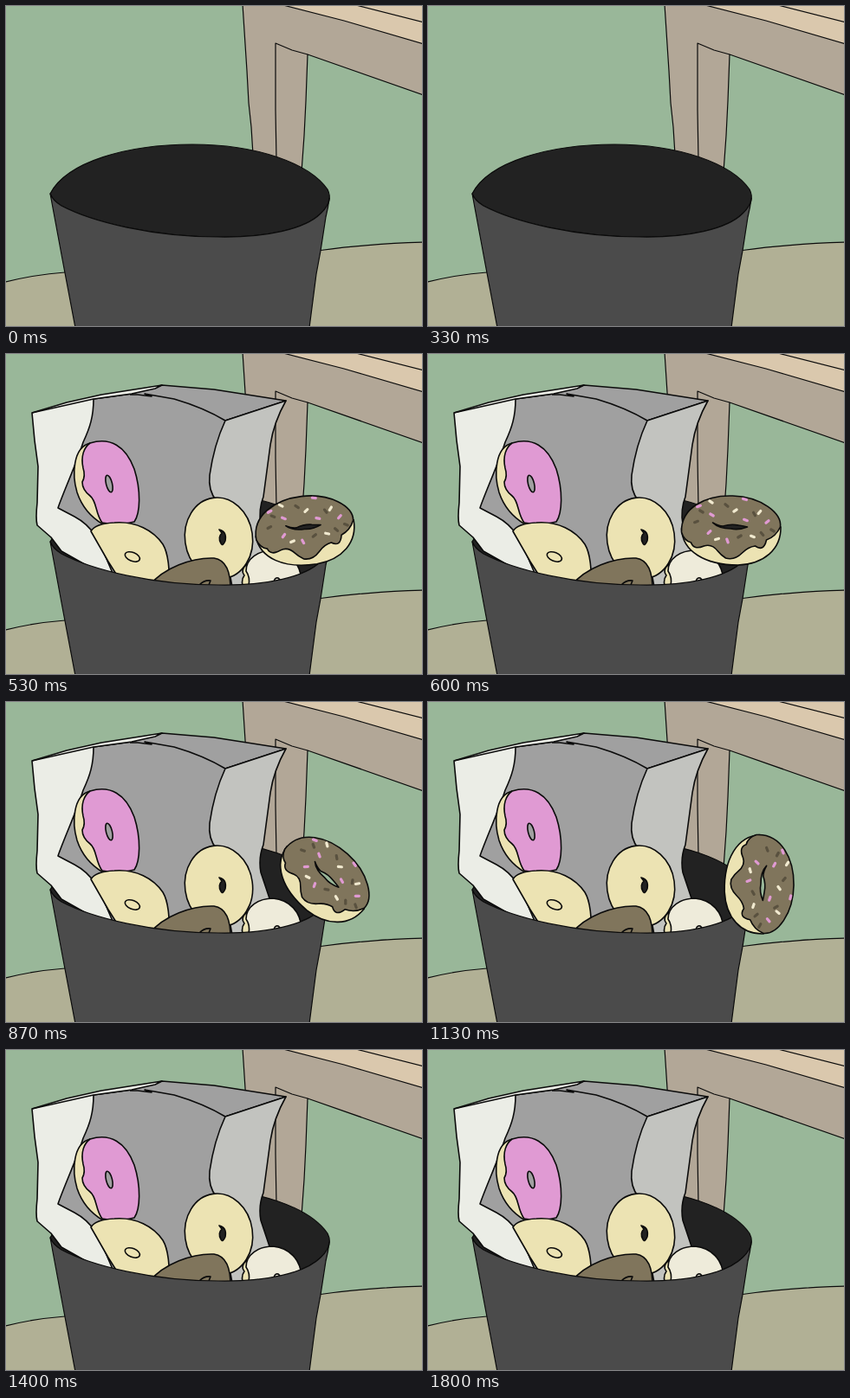
An HTML page for the animation above (2.54 s loop, 480x370 px).

```html
<!DOCTYPE html>
<html lang="en">
<head>
<meta charset="utf-8">
<title>Donuts in the bin</title>
<style>
  html, body { margin: 0; width: 100%; height: 100%; overflow: hidden; background: #99b799; }
  svg { display: block; width: 100%; height: 100%; }
  path, ellipse { stroke: #0b0b0b; stroke-width: 1.2; stroke-linejoin: round; }
  .bold path, .bold ellipse { stroke-width: 1.6; }
  .line { fill: none; }
  .bold .flat, .flat { stroke: none; }
  .wood { fill: #b2a797; }
  .paper { fill: #ebede6; }
  .side { fill: #c2c3bf; }
  .inner { fill: #a0a0a0; }
  .cream { fill: #ece3b3; }
  .brown { fill: #80755c; }
  .white { fill: #eeebda; }
  .pink { fill: #e09ad3; }
  .dark { fill: #222; }
  #sprinkles path { fill: none; stroke-width: 3.2; stroke-linecap: round; }
</style>
</head>
<body>
<svg viewBox="0 0 480 370">
  <path class="flat" fill="#99b799" d="M0 0H480V370H0Z"/>
  <path fill="#b1b095" d="M-2 319.500Q30 311 68 308L363 282.500Q415 275 482 273V372H-2Z"/>

  <!-- table -->
  <path class="wood" d="M273 -2L278 75 280 112 283 140 285 172 341 192 344 150 346 110 348 56 482 103V-2Z"/>
  <path fill="#dac8ad" d="M316 -2L390 17 482 44V-2Z"/>
  <path class="line" d="M400 -2L482 19M312 178L311 120 311 43 330 51 348 56"/>

  <path class="dark" d="M51 217C70 180 140 160 215 160C290 160 350 182 371 212C376 222 372 232 363 240C345 258 300 268 245 267C170 267 100 250 64 231Q54 225 51 217Z"/>

  <g id="spill" class="bold">
    <path class="inner" d="M101 52L145 46 180 36 240 41 323 54 253 77 262 275H120L70 212 40 190 40 75Z"/>
    <path class="side" d="M253 77L323 54C314 70 308 85 305 105L301 135 297 165Q291 180 294 197L304 227 290 275H262L243 170Q233 158 235 140Q240 105 253 77Z"/>
    <path class="line" d="M143 47L152 47 168 49 160 46 194 52Q228 62 253 77"/>
    <path class="paper" d="M30 68L70 56 110 47 180 36 172 40 145 46 101 52C101 72 97 85 89 102C82 125 66 160 60 178L79 188Q94 196 103 210L113 230 125 258 110 254 64 228 52 212 36 198Q34 190 36 172L37 130 33 100Z"/>
    <path class="line" d="M30 68L101 52"/>
    <path class="cream" d="M97 103C77 108 76 140 82 160Q90 184 112 197L125 150Z"/>
    <path class="pink" d="M97 103C120 96 138 106 148 133C156 158 155 184 148 194Q130 199 111 195C103 185 105 170 97 164Q88 157 88 148Q92 141 89 132C86 118 90 108 97 103Z"/>
    <ellipse class="inner" cx="119" cy="150" rx="3.500" ry="10" transform="rotate(-14 119 150)"/>
    <path class="cream" d="M98 205Q103 196 125 195C150 193 170 204 181 220Q190 235 188 275H140L118 240Z"/>
    <ellipse class="cream" cx="146" cy="234.500" rx="9" ry="5" transform="rotate(22 146 234)"/>
    <ellipse class="cream" cx="245.500" cy="213" rx="39" ry="47" transform="rotate(-8 245 213)"/>
    <path class="dark" d="M246 203Q255 205 253 216Q250 223 248 219Q244 212 249 207Z"/>
    <path class="brown" d="M165 268C182 247 215 235 240 236Q260 239 259 275H165Z"/>
    <path class="line" d="M223 267Q229 261 236 262L234 267"/>
    <path class="cream" d="M278 243Q270 250 275 256Q270 262 275 275H290Z"/>
    <path class="white" d="M280 268Q282 258 277 251C277 236 292 227 308 227C328 229 340 243 341 262V275H280Z"/>
    <path class="line" d="M309 266Q309 258 314 259Q318 262 316 267"/>
  </g>

  <path fill="#4b4b4b" d="M51 217Q54 225 64 231C100 250 170 267 245 267C300 268 345 258 363 240Q372 232 373 222Q372 232 369 244L363 283 358 310 350 372H80L66 298Z"/>

  <g id="drop" class="bold">
    <path class="paper" d="M76 -2L72 133 138 193 159 -2Z"/>
    <path class="side" d="M159 -2L150 80 138 193 240 164 343 143 341 -2Z"/>
    <path class="inner flat" d="M149 108L158 0H290L240 113Q212 116 195 130Z"/>
    <path class="line" d="M195 122Q215 113 240 112M240 10L262 6 285 -2"/>
    <path class="cream" d="M159 -2L160 9Q175 9 185 -2Z"/>
    <path class="cream" d="M232 -2L240 10Q258 8 266 -2Z"/>
    <path class="brown" d="M150 95C152 68 158 28 172 10Q182 -2 200 -3H228Q240 8 238 30C236 72 221 112 200 128C190 134 170 133 158 125Q149 115 150 95Z"/>
    <path class="white" d="M236 105C238 75 250 25 275 5Q287 -2 300 -1C315 2 320 20 319 45C317 85 305 120 285 138C270 144 250 143 243 135Q235 125 236 105Z"/>
    <path class="line" d="M190 80Q187 70 196 57Q199 66 190 80M277 89Q275 78 283 67Q284 78 277 89"/>
  </g>

  <g id="donut" class="bold">
    <path class="cream" d="M-57 -2C-56 24 -30 40 8 40C38 39 58 22 57.500 -4L0 -25Z"/>
    <path class="brown" d="M-57 2C-58 -27 -28 -41 2 -40C35 -39 59 -20 57 -4Q52 7 41 11Q38 25 28 18Q20 19 13 26Q4 35 -6 32Q-12 28 -15 24Q-22 15 -31 18Q-43 23 -46 14Q-54 12 -57 2Z"/>
    <g id="sprinkles"></g>
    <path id="hole" d="M-21 -9Q-14 -5 -9 -5Q0 -8 9 -6Q15 -5 19 -4Q9 0 0 -2Q-14 -2 -21 -9Z"/>
  </g>
</svg>
<script>
const $ = id => document.getElementById(id);
const LOOP = 2540, LAND = 8, TIP = 17, GONE = 21;

// x, y, angle of each sprinkle
const sprinkles = {
  '#e09ad3': [-37,-28,-20, -22,-18,30, 16,-36,15, 42,-10,-40, -25,2,-45, -4,12,70, 17,-12,20],
  '#f1ead0': [-23,-33,35, 5,-23,-35, 33,-21,-50, 25,7,20, -16,10,-15],
  '#59513f': [-34,-22,30, -5,-29,40, 27,-19,60, -40,-10,-20, 48,0,30, 36,4,50, 10,7,-30]
};
let marks = '';
for (const [color, list] of Object.entries(sprinkles))
  for (let i = 0; i < list.length; i += 3)
    marks += `<path style="stroke:${color}" d="M-2 0H2" transform="translate(${list[i]} ${list[i + 1]}) rotate(${list[i + 2]})"/>`;
$('sprinkles').innerHTML = marks;

const show = (id, on) => $(id).style.display = on ? '' : 'none';

function draw(now) {
  const n = Math.floor((now % LOOP + 3.4) * 0.015); // 15 poses per second
  show('drop', n === LAND - 1);
  show('spill', n >= LAND);
  show('donut', n >= LAND && n < GONE);

  // tips over the rim, then falls
  const u = (n - 9) / 4, fall = Math.max(0, n - TIP);
  const x = 349.5 + 18.25 * u - u * u;
  const y = 204 - 1.25 * u + 2.25 * u * u + 20 * fall * fall;
  const angle = 35.5 * u + 4.5 * u * u;
  $('donut').setAttribute('transform', `translate(${x} ${y}) rotate(${angle})`);
  $('hole').setAttribute('fill', n < 12 ? '#222' : '#99b799');
}

const start = performance.now();
function tick() {
  draw(performance.now() - start);
  requestAnimationFrame(tick);
}
tick();
</script>
</body>
</html>
```
